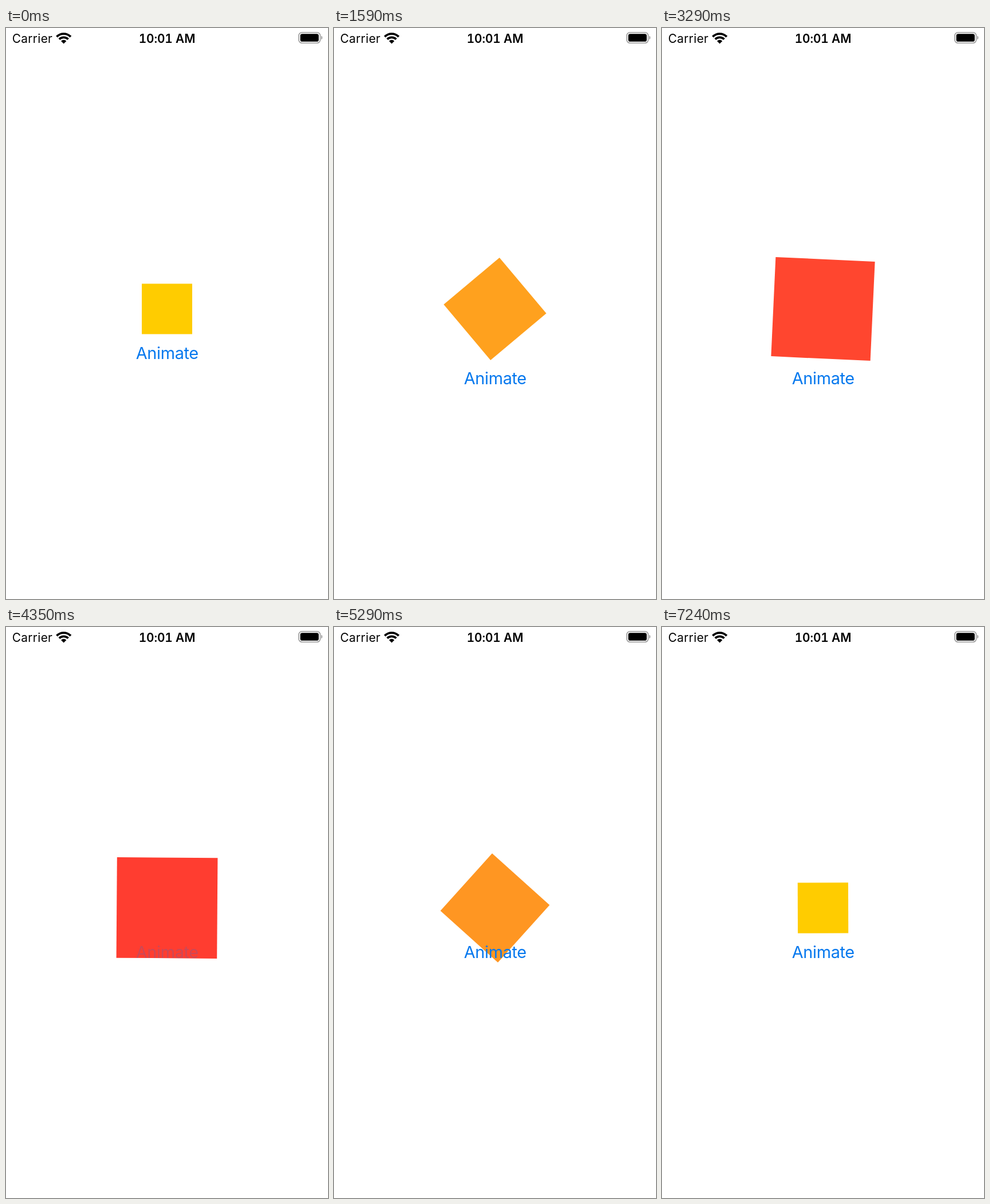
Recreate the animation shown at these times as an HTML page. Size 562 by 997 pixels, loop 7.34 s.

```html
<!DOCTYPE html>
<html lang="en">
<head>
<meta charset="utf-8">
<title>Animate</title>
<style>
  @property --p {
    syntax: "<number>";
    inherits: false;
    initial-value: 0;
  }

  html, body {
    margin: 0;
    height: 100%;
    overflow: hidden;
    background: #fff;
  }

  svg {
    display: block;
    width: 100%;
    height: 100%;
    font-family: Inter, "Liberation Sans", sans-serif;
  }

  /* --p runs from 0 (small, yellow) to 1 (large, red); the colour mixes in linear light */
  .box {
    fill: color(srgb-linear 1 calc(0.604 - 0.56 * var(--p)) calc(0.0296 * var(--p)));
    transform: rotate(calc(var(--p) * -90deg)) scale(calc(1 + var(--p)));
    animation: morph 7340ms infinite;
  }

  .label {
    fill: #0578ee;
    font-size: 28.9px;
    letter-spacing: -0.35px;
    text-anchor: middle;
    animation: shift 7340ms linear infinite, press 7340ms linear infinite;
  }

  .status { font-size: 20.8px; }
  .carrier { letter-spacing: 0.35px; }

  .clock {
    font-weight: 600;
    font-variant-numeric: tabular-nums;
    letter-spacing: -0.1px;
    text-anchor: middle;
  }

  @keyframes morph {
    0% { --p: 0; }
    9.428% { --p: 0; animation-timing-function: cubic-bezier(0, 0, 0.58, 1); }
    50.3% { --p: 1; }
    59.169% { --p: 1; animation-timing-function: cubic-bezier(0, 0, 0.58, 1); }
    100% { --p: 0; }
  }

  @keyframes shift {
    0%, 9.42% { transform: translateY(0); }
    9.43%, 59.16% { transform: translateY(44px); }
    59.17%, 100% { transform: translateY(0); }
  }

  @keyframes press {
    0%, 8.44% { opacity: 1; }
    8.45%, 9.6% { opacity: 0.2; }
    14%, 59.16% { opacity: 1; }
    59.17%, 59.9% { opacity: 0.2; }
    64.3%, 100% { opacity: 1; }
  }
</style>
</head>
<body>
<svg viewBox="0 0 562 997">
  <clipPath id="fan"><path d="M100.7 27.4 L80.7 7.4 H120.7 Z"/></clipPath>

  <g class="status">
    <text class="carrier" x="10.8" y="25.7">Carrier</text>
    <text class="clock" x="281" y="25.7">10:01 AM</text>
  </g>

  <g clip-path="url(#fan)" fill="none" stroke="#000" stroke-width="3.8">
    <circle cx="100.7" cy="27.2" r="17.1"/>
    <circle cx="100.7" cy="27.2" r="10.9"/>
    <circle cx="100.7" cy="27.2" r="6.4" fill="#000" stroke="none"/>
  </g>

  <rect x="511" y="7.7" width="37.4" height="18.6" rx="5.6" fill="none" stroke="#999" stroke-width="1.6"/>
  <rect x="513.6" y="10.2" width="32.2" height="13.6" rx="3.4"/>
  <path d="M550.2 13.6 Q552.2 14.6 552.2 17 T550.2 20.4 Z" fill="#999"/>

  <g transform="translate(281 490.5)">
    <rect class="box" x="-44" y="-44" width="88" height="88"/>
  </g>
  <text class="label" x="281.3" y="577.6">Animate</text>
</svg>
</body>
</html>
```
